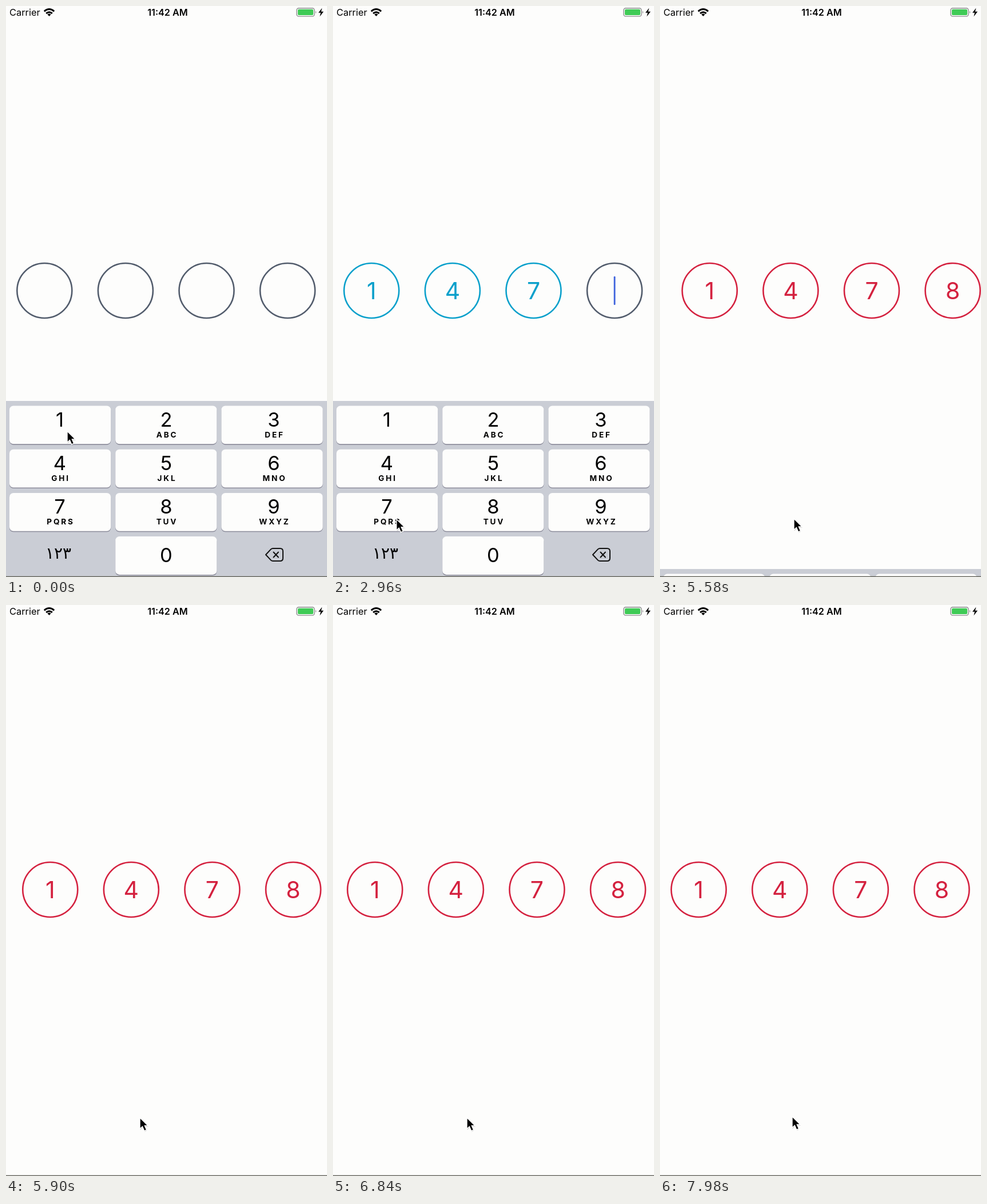
An HTML page that plays this animation: 561 px wide and 999 px high, repeating every 8 s.

```html
<!DOCTYPE html>
<html lang="en">
<head>
<meta charset="utf-8">
<title>Passcode entry</title>
<style>
  html, body { margin: 0; width: 100%; height: 100%; overflow: hidden; background: #fdfdfc; }
  svg { display: block; width: 100%; height: 100%; font-family: Inter, Roboto, sans-serif; }
  .mid { text-anchor: middle; }
</style>
</head>
<body>
<svg id="stage" viewBox="0 0 561 999">
  <rect width="561" height="999" fill="#fdfdfc"/>

  <g id="status">
    <text x="6" y="17" font-size="16.4">Carrier</text>
    <g fill="none" stroke="#000" stroke-width="3">
      <path d="M66.8 9.3Q75.5 1.8 84.2 9.3"/>
      <path d="M70.2 13Q75.5 8.4 80.8 13"/>
    </g>
    <path d="M72.4 14.7Q75.5 12.4 78.6 14.7L75.5 18Z"/>
    <text class="mid" x="282.5" y="17" font-size="16.2" font-weight="600">11:42 AM</text>
    <rect x="508" y="3.7" width="31" height="14.4" rx="3.6" fill="none" stroke="#8c8c8e" stroke-width="1.4"/>
    <rect x="510" y="5.7" width="27" height="10.4" rx="1.8" fill="#3fcb56"/>
    <path d="M541 8.5Q543.4 10.9 541 13.3Z" fill="#8c8c8e"/>
    <path d="M552.4 3.4L546 11.8H550L548.4 18.6L555 9.8H550.8Z"/>
  </g>

  <g id="cells"></g>
  <rect id="caret" y="473" width="2.8" height="50" rx="1.2" fill="#3d62dc"/>

  <g id="keyboard">
    <rect y="691" width="561" height="330" fill="#cacdd5"/>
    <g id="keys"></g>
    <text class="mid" x="91.5" y="967" font-size="28" font-family="'DejaVu Sans', sans-serif">١٢٣</text>
    <g fill="none" stroke="#111" stroke-width="2" stroke-linejoin="round" stroke-linecap="round">
      <path d="M454 960L463 950.4Q464.4 949 466.5 949H479Q484 949 484 954V966Q484 971 479 971H466.5Q464.4 971 463 969.6Z"/>
      <path d="M467.5 955.5L476 964.5M476 955.5L467.5 964.5"/>
    </g>
  </g>
  <rect y="997.6" width="561" height="1.4" fill="#66665e"/>

  <g id="pointer">
    <path d="M.5 2V21.5L5 17.3L8.2 24.5L12 22.8L8.9 15.8H15Z" fill="#000" opacity=".18"/>
    <path d="M0 0V19.6L4.4 15.5L7.7 23L11.6 21.3L8.4 14H14.2Z" fill="#000" stroke="#fff" stroke-width="1.4"/>
  </g>
</svg>
<script>
const LOOP = 8000, HOLD = 120, FAIL = 5240;
const GREY = '#525c6c', BLUE = '#0aa0cb', RED = '#d4213f';
const presses = [
  { key: 1, at: 600 }, { key: 4, at: 1640 }, { key: 7, at: 2780 }, { key: 8, at: 4620 }
];
// time, x, y
const track = [
  [0, 107, 744], [800, 107, 745], [1400, 109, 842], [1900, 109, 842],
  [2500, 110, 896], [3100, 111, 898], [3900, 224, 894], [4800, 226, 895],
  [5400, 234, 897], [7600, 234, 897], [7900, 231, 895]
];

const $ = id => document.getElementById(id);
function add(parent, tag, attrs, text) {
  const node = document.createElementNS('http://www.w3.org/2000/svg', tag);
  for (const name in attrs) node.setAttribute(name, attrs[name]);
  if (text !== undefined) node.textContent = text;
  return parent.appendChild(node);
}
const clamp = v => Math.min(1, Math.max(0, v));
const smooth = v => { v = clamp(v); return v * v * (3 - 2 * v); };

const letters = ['', 'ABC', 'DEF', 'GHI', 'JKL', 'MNO', 'PQRS', 'TUV', 'WXYZ'];
const labelX = [94, 280, 468];
const keys = {};
function addKey(digit, col, row, sub) {
  const x = 6 + col * 185.2, y = 699.5 + row * 76.2;
  const box = { x, width: 177.2, height: 66.8, rx: 7 };
  add($('keys'), 'rect', { ...box, y: y + 1.6, fill: '#8b8b9a' });
  keys[digit] = add($('keys'), 'rect', { ...box, y });
  const base = row === 3 ? 972.8 : y + 36;
  add($('keys'), 'text', { class: 'mid', x: labelX[col], y: base, 'font-size': 34.5 }, digit);
  if (sub) add($('keys'), 'text', {
    class: 'mid', x: labelX[col] + 1.5, y: y + 55.5,
    'font-size': 13.6, 'font-weight': 700, 'letter-spacing': 2.8
  }, sub);
}
letters.forEach((sub, i) => addKey(i + 1, i % 3, Math.floor(i / 3), sub));
addKey(0, 1, 3);

const cells = presses.map((p, i) => {
  const x = 67.3 + i * 141.6;
  return {
    x,
    ring: add($('cells'), 'circle', { cx: x, cy: 498, r: 48, fill: 'none', 'stroke-width': 2.6 }),
    digit: add($('cells'), 'text', { class: 'mid', x, y: 513, 'font-size': 41 }, p.key)
  };
});

// Bouncing return to rest, after a quick push to the right
function shake(t) {
  const x = (t - 5035) / 1105;
  if (t < FAIL || x > 2.75) return 0;
  const left = x < 1 ? 1 - x * x
    : x < 2 ? 0.25 - (x - 1.5) ** 2
    : x < 2.5 ? 0.0625 - (x - 2.25) ** 2
    : 0.015625 - (x - 2.625) ** 2;
  return 25.8 * left * smooth((t - FAIL) / 120);
}

// Critically damped slide off the bottom
function keyboardDrop(t) {
  const w = Math.max(0, t - FAIL) * 0.01426;
  return 308 * (1 - (1 + w) * Math.exp(-w));
}

function caretAlpha(since) {
  const p = (since % 1000) / 1000;
  return 1 - smooth((p - 0.5) / 0.2) + smooth((p - 0.82) / 0.16);
}

function pointerAt(t) {
  let i = track.length - 1;
  while (track[i][0] > t) i--;
  const a = track[i], b = track[i + 1] || a;
  const k = smooth((t - a[0]) / (b[0] - a[0] || 1));
  return [a[1] + (b[1] - a[1]) * k, a[2] + (b[2] - a[2]) * k];
}

function draw(t) {
  const count = presses.filter(p => t >= p.at + HOLD).length;
  const done = t >= FAIL ? RED : BLUE;

  cells.forEach((c, i) => {
    const filled = i < count;
    c.ring.setAttribute('stroke', filled ? done : GREY);
    c.digit.setAttribute('fill', filled ? done : 'none');
  });
  $('cells').setAttribute('transform', `translate(${shake(t)} 0)`);

  if (count < cells.length) {
    const start = count ? presses[count - 1].at + HOLD : -750;
    $('caret').setAttribute('x', cells[count].x - 1.4);
    $('caret').setAttribute('opacity', caretAlpha(t - start));
  } else {
    $('caret').setAttribute('opacity', 0);
  }

  const held = presses.find(p => t >= p.at && t < p.at + HOLD);
  for (const k in keys) keys[k].setAttribute('fill', held && held.key == k ? '#abb8c8' : '#fdfdfc');

  $('keyboard').setAttribute('transform', `translate(0 ${keyboardDrop(t)})`);
  $('pointer').setAttribute('transform', `translate(${pointerAt(t)})`);
}

const begin = performance.now();
function tick() {
  draw((performance.now() - begin) % LOOP);
  requestAnimationFrame(tick);
}
tick();
</script>
</body>
</html>
```
